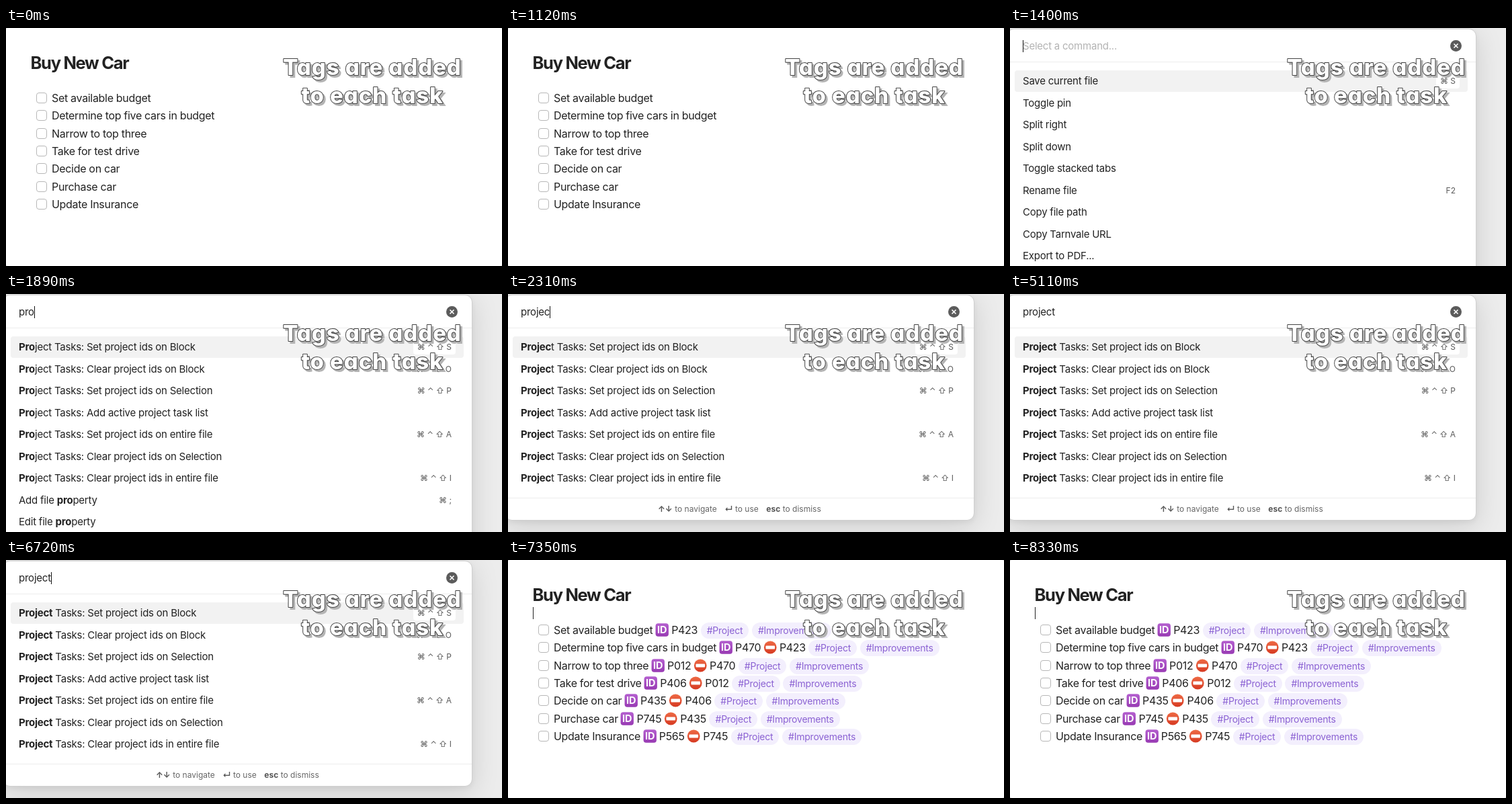
Animation, 738 px wide and 354 px high, one loop 8.4 s. Source, as an HTML page:

```html
<!DOCTYPE html>
<html lang="en">
<head>
<meta charset="utf-8">
<title>Tags are added to each task</title>
<style>
  html, body { margin: 0; width: 100%; height: 100%; overflow: hidden; background: #dedede; }
  body { font-family: Inter, "DejaVu Sans", sans-serif; color: #222; white-space: nowrap; }
  #stage { position: absolute; left: 0; top: 0; width: 738px; height: 354px; overflow: hidden; }
  #stage *, .task::before { box-sizing: border-box; }
  #note, #palette, #caption { position: absolute; }
  [hidden] { display: none !important; }

  #note { inset: 0; background: #fff; border-radius: 3px; font-size: 16px; letter-spacing: -.31px; }
  h1 { position: absolute; left: 36.5px; top: 36px; margin: 0; font: 700 25.5px/32px Inter, sans-serif; letter-spacing: -1.3px; }
  .task { position: absolute; left: 68px; height: 26px; line-height: 26px; }
  .task::before { content: ""; position: absolute; left: -23px; top: 5px; width: 16px; height: 16px; border: 1px solid #b8b8b8; border-radius: 4px; }
  .task svg { width: 20.5px; height: 20px; margin: 0 -.5px 0 -.7px; vertical-align: -4px; }
  .tag { display: inline-block; height: 24px; margin-left: .4px; padding: 0 9px; border-radius: 12px; background: #f3effd; color: #8b62d3; font-size: 14px; line-height: 24px; letter-spacing: -.22px; }
  #noteCaret { position: absolute; left: 37px; top: 70px; width: 1px; height: 18px; background: #222; }

  #shade { position: absolute; inset: 0; background: #ececec; }
  #palette { left: -5px; top: 1px; width: 699px; background: #fff; border: 1px solid #cfcfcf; border-radius: 11px; box-shadow: 0 3px 7px #0000000d, 0 8px 40px #00000022; }
  #view { position: absolute; inset: 0; font-size: 15px; letter-spacing: -.23px; }
  #query { position: absolute; left: 19px; top: 17px; height: 19px; line-height: 19px; }
  #query.empty { color: #b3b3b3; }
  #queryCaret { display: inline-block; width: 1px; height: 18px; margin-right: -1px; background: #111; vertical-align: -4px; }
  #clear { position: absolute; left: 655px; top: 18px; }
  .line { position: absolute; left: 0; width: 693px; height: 1px; background: #ededed; }
  .row { position: absolute; left: 7px; width: 674px; height: 32px; padding-left: 12px; line-height: 32px; border-radius: 4px; }
  .row.on { background: #f2f2f2; }
  .row b { font-weight: 700; }
  .keys { position: absolute; right: 12px; top: 5px; height: 22px; display: flex; gap: 3.3px; padding: 0 6px; border-radius: 4px; color: #5a5a5a; font-size: 12px; line-height: 22px; letter-spacing: 0; }
  .on .keys { background: #fff; }
  #help { position: absolute; left: 223px; top: 310px; display: flex; gap: 11.5px; color: #666; font-size: 12px; line-height: 20px; letter-spacing: 0; }
  #help b { color: #555; margin-right: 3.5px; }

  #caption { left: 0; top: 0; font: 800 33px Inter, sans-serif; font-feature-settings: "cv11"; letter-spacing: .9px; text-anchor: middle; }
</style>
</head>
<body>
<div id="stage">
  <div id="note">
    <h1>Buy New Car</h1>
    <div id="tasks"></div>
    <div id="noteCaret"></div>
  </div>
  <div id="shade">
    <div id="palette"></div>
    <div id="view">
      <div id="query"><span id="typed"></span><i id="queryCaret"></i><span id="hint">Select a command...</span></div>
      <svg id="clear" width="17" height="17"><circle cx="8.5" cy="8.5" r="8.5" fill="#5b5b5b"/><path d="M5.5 5.5l6 6m0-6l-6 6" stroke="#fff" stroke-width="1.6"/></svg>
      <div class="line" style="top:50px"></div>
      <div id="rows"></div>
      <div id="foot">
        <div class="line" style="top:303px"></div>
        <div id="help"><span><b>↑↓</b>to navigate</span><span><b>↵</b>to use</span><span><b>esc</b>to dismiss</span></div>
      </div>
    </div>
  </div>
  <svg id="caption" width="738" height="354">
    <defs>
      <g id="words"><text x="545" y="69.5">Tags are added</text><text x="545" y="111.8">to each task</text></g>
      <linearGradient id="purple" x2="0" y2="1"><stop stop-color="#b45fcf"/><stop offset="1" stop-color="#983ab3"/></linearGradient>
      <linearGradient id="red" x2="0" y2="1"><stop stop-color="#ee6a45"/><stop offset="1" stop-color="#d63a22"/></linearGradient>
    </defs>
    <use href="#words" x="3" y="3" fill="#b4b4b4" stroke="#b4b4b4" stroke-width="2"/>
    <use href="#words" fill="#fff" stroke="#444" stroke-width="2" stroke-linejoin="round" paint-order="stroke"/>
  </svg>
</div>
<script>
const $ = id => document.getElementById(id);
const LOOP = 8400, STEP = 70;

const tasks = [
  ['Set available budget', 'P423'],
  ['Determine top five cars in budget', 'P470'],
  ['Narrow to top three', 'P012'],
  ['Take for test drive', 'P406'],
  ['Decide on car', 'P435'],
  ['Purchase car', 'P745'],
  ['Update Insurance', 'P565'],
];

const commands = [
  ['Save current file', '⌘ S'], ['Toggle pin'], ['Split right'], ['Split down'],
  ['Toggle stacked tabs'], ['Rename file', 'F2'], ['Copy file path'],
  ['Copy Tarnvale URL'], ['Export to PDF...'],
];

const matches = [
  ['Set project ids on Block', '⌘ ⌃ ⇧ S'],
  ['Clear project ids on Block', '⌘ ⌃ ⇧ O'],
  ['Set project ids on Selection', '⌘ ⌃ ⇧ P'],
  ['Add active project task list'],
  ['Set project ids on entire file', '⌘ ⌃ ⇧ A'],
  ['Clear project ids on Selection'],
  ['Clear project ids in entire file', '⌘ ⌃ ⇧ I'],
].map(([name, keys]) => ['Project Tasks: ' + name, keys])
 .concat([['Add file property', '⌘ ;'], ['Edit file property']]);

// Start time of each query while the palette is open
const OPEN = 1330, CLOSE = 7350;
const typing = [[OPEN, ''], [1750, 'pr'], [1890, 'pro'], [2100, 'proj'], [2170, 'proje'], [2310, 'projec'], [2520, 'project']];
const blinks = [[3010, 3570], [4060, 4620], [5110, 5670], [6160, 6720]];

const idIcon = '<svg viewBox="0 0 20 20"><rect x=".3" y=".3" width="19.4" height="19.4" rx="4" fill="url(#purple)"/><text x="10" y="15.2" fill="#fff" text-anchor="middle" font-size="14.5" font-weight="700" letter-spacing="0">ID</text></svg>';
const blockIcon = '<svg viewBox="0 0 20 20"><circle cx="10" cy="10" r="9.4" fill="url(#red)"/><rect x="3.2" y="7.6" width="13.6" height="4.8" rx="1" fill="#fff"/></svg>';
const tag = name => `<span class="tag">#${name}</span>`;

function drawTasks(tagged) {
  $('tasks').innerHTML = tasks.map(([name, id], i) => {
    const parts = [name];
    if (tagged) {
      parts.push(idIcon, id);
      if (i) parts.push(blockIcon, tasks[i - 1][1]);
      parts.push(tag('Project'), tag('Improvements'));
    }
    return `<div class="task" style="top:${91 + i * 26.35}px">${parts.join(' ')}</div>`;
  }).join('');
}

function drawPalette(query) {
  const narrowed = query.length > 3;
  const list = query ? matches.slice(0, narrowed ? 7 : 9) : commands;
  const mark = name => query ? name.replace(new RegExp(query, 'i'), '<b>$&</b>') : name;
  const keycaps = keys => keys ? `<span class="keys">${keys.split(' ').map(k => `<span>${k}</span>`).join('')}</span>` : '';
  $('rows').innerHTML = list.map(([name, keys], i) =>
    `<div class="row${i ? '' : ' on'}" style="top:${63 + i * 32.5}px">${mark(name)}${keycaps(keys)}</div>`).join('');
  $('typed').textContent = query;
  $('query').className = query ? '' : 'empty';
  $('hint').hidden = !!query;
  $('foot').hidden = !narrowed;
  $('palette').style.height = (narrowed ? 336 : 420) + 'px';
}

const clamp = v => Math.max(0, Math.min(1, v));
let shown;

function frame(now) {
  const t = Math.floor((now % LOOP) / STEP) * STEP;
  const open = t >= OPEN && t < CLOSE;
  const done = t >= CLOSE;
  const query = open ? typing.filter(([start]) => start <= t).pop()[1] : '';
  const state = open + query + done;
  if (state !== shown) {
    shown = state;
    $('shade').hidden = !open;
    if (open) drawPalette(query); else drawTasks(done);
  }
  const off = blinks.some(([from, to]) => t >= from && t < to);
  $('queryCaret').style.opacity = off ? 0 : 1;
  const fade = 1 - clamp((t - 7700) / 280) + clamp((t - 8050) / 280);
  $('noteCaret').style.opacity = done ? fade : 0;
}

const start = performance.now();
function tick() {
  frame(performance.now() - start);
  requestAnimationFrame(tick);
}
tick();
</script>
</body>
</html>
```
